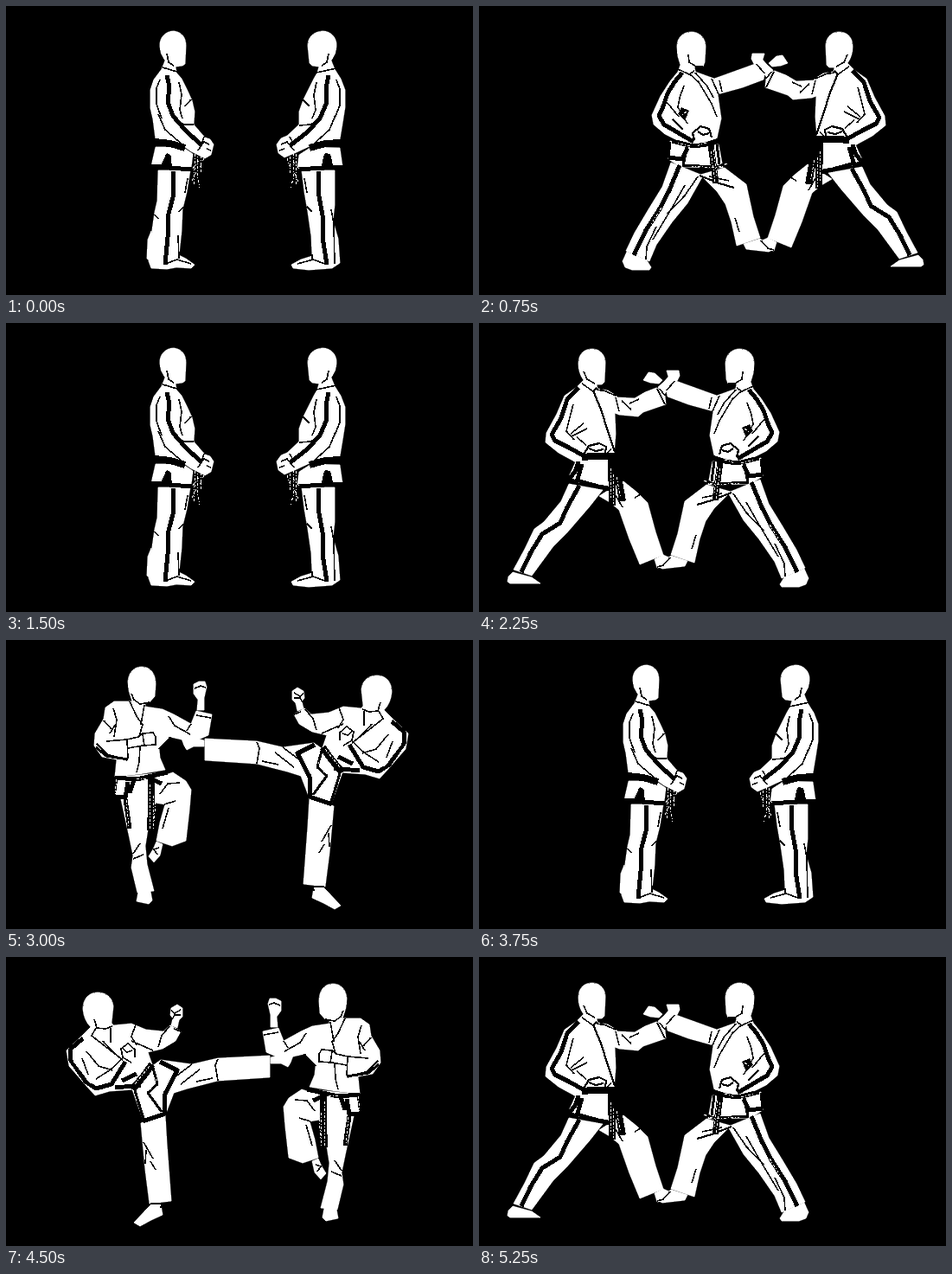
Write an HTML page that moves like this. It is 540 by 334 pixels and loops after 6000 ms.

```html
<!DOCTYPE html>
<html lang="en">
<head>
<meta charset="utf-8">
<title>Sparring drill</title>
<style>
html, body { margin: 0; width: 100%; height: 100%; overflow: hidden; background: #000; }
svg { display: block; width: 100vw; height: 100vh; }
path { fill: none; stroke: #000; stroke-linejoin: round; shape-rendering: crispEdges; }
.w { fill: #fff; stroke: #fff; stroke-width: .8; }
.k { fill: #000; stroke: none; }
.l { stroke-width: 1.6; }
.m { stroke-width: 3; }
.s { stroke-width: 5; }
.b { stroke-width: 8; }
.h { stroke: #fff; stroke-width: 1; stroke-dasharray: 3 2 1 2; }
#stage > g { opacity: 0; }
</style>
</head>
<body>
<svg viewBox="0 0 540 334">
<defs>
  <g id="stand">
    <!-- left -->
    <path class="w" d="M178 47C177 36 185 29 194 29C203 30 208 36 208 46L207 67L204 69L196 70L197 77L203 84L209 96L215 109L218 122L217 137L230 152L236 154L240 160L237 172L230 176L214 168L204 161L173 154L170 131L167 118L167 97L171 85L180 73L184 63Q178 55 178 47Z"/>
    <path class="w" d="M173 163L204 163L216 171L214 187L168 185Z"/>
    <path class="w" d="M176 190L213 190L209 215L204 235L203 260L200 288L208 292L218 299L214 303L197 302L186 304L168 303L165 295L168 266L172 238L175 225Z"/>
    <path class="w" d="M164 270L168 260L167 295L163 292Z"/>
    <path class="l" d="M186 55L188 65L194 69M181 71L198 76M178 85L174 95L174 113L180 130M200 88L203 102L201 120L204 130M214 108L207 116M196 132L206 137L217 137M222 167L229 157L235 160M229 151L226 160M232 165L237 167M176 125L184 143L205 161"/>
    <path class="s" d="M186 80L189 93L187 111L193 127L207 143L226 161"/>
    <path class="b" d="M172 157L190 159L207 164"/>
    <path class="s" d="M167 185L181 186L187 173L189 187L215 189"/>
    <path class="k" d="M180 186L186 170L191 173L192 190Z"/>
    <path class="s" d="M194 191L193 221L188 240L187 267L184 299"/>
    <path class="l" d="M205 232L200 238M199 265L200 292M184 298L198 293L214 298M172 241L176 246M210 199L207 216"/>
    <path class="h" d="M219 171L217 207M222 169L221 197L224 210M226 173L225 193M229 176L224 188M216 188L223 178M215 202L220 192"/>
    <!-- right -->
    <path class="w" d="M382 47C383 36 375 29 366 29C355 30 349 36 349 46L351 66L354 69L362 70L360 77L356 84L350 96L344 108L339 122L339 137L325 150L318 153L313 160L315 170L322 175L336 169L351 162L386 154L389 136L392 117L392 97L387 84L380 73L376 63Q382 55 382 47Z"/>
    <path class="w" d="M386 164L353 163L339 172L337 187L389 185Z"/>
    <path class="w" d="M342 190L380 190L380 230L378 248L384 269L386 297L377 303L350 305L332 303L330 299L341 293L354 289L353 266L349 238L345 215Z"/>
    <path class="l" d="M373 55L371 65L365 69M359 77L382 72M382 85L386 96L386 115L379 132M359 88L356 103L358 120L354 130M343 108L351 116M363 132L352 137L339 138M333 167L325 157L318 160M328 151L333 160M322 165L316 167M381 126L374 143L354 161"/>
    <path class="s" d="M373 80L370 95L371 111L363 130L348 146L329 161"/>
    <path class="b" d="M387 158L369 159L351 164"/>
    <path class="s" d="M391 186L375 186L370 173L367 187L337 189"/>
    <path class="k" d="M364 190L369 170L375 171L379 188Z"/>
    <path class="s" d="M361 191L362 220L366 242L366 267L371 299"/>
    <path class="l" d="M348 232L354 238M376 235L379 252L380 298M354 287L354 294M369 298L355 293L337 298M345 199L348 216"/>
    <path class="h" d="M335 171L335 207M332 170L333 197L329 210M328 174L329 193M325 176L329 188M339 188L330 178M338 203L333 192"/>
  </g>

  <g id="guard">
    <!-- left -->
    <path class="w" d="M115 47C115 35 122 30 131 30C140 30 146 37 146 46L145 68L142 71L136 71L137 76L149 78L157 83L160 86L180 87L192 80L205 75L210 77L215 84L216 94L190 103L184 108L162 106L157 104L158 128L156 153L122 156L114 162L92 150L77 138L78 127L90 105L99 84L112 75L121 66Q115 58 115 47Z"/>
    <path class="w" d="M207 74L214 68L219 62L217 55L231 55L232 61L228 69L219 75L214 83Z"/>
    <path class="w" d="M112 160L156 155L156 190L102 182Z"/>
    <path class="w" d="M104 186L143 193L128 212L103 241L86 258L61 292L40 285L53 261L64 238L75 230L95 206Z"/>
    <path class="w" d="M39 288L61 294L71 301L36 301L33 299L34 293Z"/>
    <path class="w" d="M139 200L150 193L167 183L182 195L195 208L204 241L213 268L186 279L174 250L162 216L151 207Z"/>
    <path class="w" d="M203 273L213 268L222 272L217 281L206 283Z"/>
    <path class="l" d="M121 56L125 65L134 70M119 70L132 79L136 75M136 77L148 79M109 94L105 109L101 125L110 135M121 116L106 128M125 122L107 131M158 86L162 102M165 90L176 100M185 88L174 93M206 76L215 94M209 76L215 84M147 151L153 146M158 199L166 213M187 198L180 202M113 132L124 141M140 76L158 84"/>
    <path style="stroke-width:2.2" d="M132 78L141 100L149 125L157 149M121 152L127 142L139 139L147 143L146 150M127 145L135 148L144 146"/>
    <path class="s" d="M115 75L102 88L95 110L84 129L88 136L104 144L122 154"/>
    <path class="b" d="M119 155L132 154L158 154"/>
    <path class="s" d="M115 160L112 170L104 181L113 184L119 163M116 183L138 189L154 192"/>
    <path class="s" d="M116 188L102 213L94 231L73 244L60 265L49 288"/>
    <path class="b" d="M153 154L154 211M157 155L166 206"/>
    <path class="h" d="M152 168L152 202M156 175L155 209M159 178L164 202"/>
    <!-- right -->
    <path class="w" d="M285 47C285 36 293 30 301 30C311 30 318 36 318 47Q318 59 314 68L317 76L326 87L337 104L347 126L345 137L332 148L318 155L298 161L272 153L267 130L271 102L242 94L218 85L216 73L225 66L250 75L275 84L297 76L298 70L288 70L286 65Z"/>
    <path class="w" d="M190 66L196 57L203 58L212 66L208 70L198 69Z"/>
    <path class="w" d="M270 160L298 164L326 156L328 177L314 186L265 187Z"/>
    <path class="w" d="M263 187L291 195L272 214L262 229L255 250L249 277L222 268L230 243L238 206Z"/>
    <path class="w" d="M288 196L325 181L335 209L351 235L367 262L377 283L350 295L342 276L324 250L306 228Z"/>
    <path class="w" d="M222 269L241 275L238 281L212 284L206 281Z"/>
    <path class="w" d="M353 294L376 284L381 295L378 302L370 305L350 305L348 302Z"/>
    <path class="l" d="M305 56L304 65L296 70L288 70M298 75L304 79L317 73M303 79L293 88L278 113L272 128M297 77L283 93L276 106M310 92L315 106L317 117L306 136M278 84L270 102M269 86L266 99M226 67L217 78M330 111L316 128M323 131L311 143M206 282L213 280L221 271M258 202L281 197M294 197L309 219L329 240M309 207L322 230L346 270M342 255L353 278L354 293M251 245L246 261"/>
    <path style="stroke-width:2.2" d="M278 152L281 142L291 139L300 147L298 155M281 147L288 149L294 145M252 210L269 205L292 196"/>
    <path class="s" d="M312 77L321 88L329 101L334 116L339 127L333 137L316 147L299 157"/>
    <path class="k" d="M304 121L313 117L317 125L309 132Z"/>
    <path class="s" d="M270 155L284 160L299 162L324 156M306 164L312 177L328 175"/>
    <path class="m" d="M326 157L328 175M272 160L269 183M258 181L272 186L312 184M306 162L311 184"/>
    <path class="s" d="M315 184L327 213L339 236L354 259L368 288"/>
    <path d="M279 160L273 205" style="stroke-width:7"/>
    <path class="h" d="M260 182L272 187L301 185M279 168L274 203M276 166L272 198M284 158L296 162M303 162L318 158M336 233L348 252M307 122L314 127"/>
  </g>

  <g id="kick">
    <!-- blocker -->
    <path class="w" d="M141 48C142 36 149 31 157 31C168 31 173 40 173 51L172 65L166 72L161 73L161 77L181 80L194 86L214 97L220 82L238 86L234 110L216 118L190 112L177 126L178 136L184 150L154 155L126 158L128 138L111 135L102 122L103 108L113 91L115 78L125 71L146 71Q141 59 141 48Z"/>
    <path class="w" d="M217 51L223 48L230 48L232 54L229 67L229 81L221 81L222 69L217 62Z"/>
    <path class="w" d="M126 159L183 153L178 176L164 184L123 182Z"/>
    <path class="w" d="M133 184L166 181L165 213L161 238L163 259L171 290L152 292L145 263L147 249L142 225Z"/>
    <path class="w" d="M153 291L167 290L169 301L165 305L151 302Z"/>
    <path class="w" d="M171 171L181 157L193 153L208 163L214 173L212 197L208 232L192 238L174 232L178 211L184 190L172 188Z"/>
    <path class="w" d="M174 233L181 236L178 249L171 257L165 250L170 242Z"/>
    <path class="l" d="M145 62L148 69L155 74L166 72M143 71L151 88L158 98L154 111M160 75L156 98M155 122L154 141L151 153M124 79L128 92L125 112M113 93L122 103M127 97L120 108M140 115L153 112L158 108L170 107L173 112L173 121L158 122L141 125M140 115L141 137M116 117L140 115M105 120L117 132L140 139M158 109L160 122M188 88L195 99L213 109M214 97L209 105M177 126L190 112M220 87L237 90M218 56L225 53L231 55M178 178L187 166L201 165M183 190L196 186M147 247L155 235M147 253L159 248M188 194L181 218M177 240L171 242L175 248"/>
    <path class="s" d="M126 159L151 161L187 153"/>
    <path class="m" d="M104 124L116 134L141 138"/>
    <path class="s" d="M127 159L124 181L138 182L141 164M138 184L143 218M149 158L143 177M163 158L180 166"/>
    <path class="b" d="M168 161L168 190L167 220"/>
    <path class="h" d="M166 167L166 220M170 180L170 218M173 187L171 209M139 185L142 216M128 161L126 178M151 161L162 160"/>
    <!-- kicker -->
    <path class="w" d="M411 57C412 46 420 41 429 41C439 41 446 48 446 60Q445 73 437 81L448 92L465 108L462 126L442 149L432 160L415 155L387 153L365 127L371 110L354 106L339 97L333 86L345 79L353 86L373 84L390 77L411 79L413 76Z"/>
    <path class="w" d="M331 59L337 55L344 59L345 67L342 71L344 79L337 82L335 73L331 69Z"/>
    <path class="w" d="M230 114L290 117L320 124L356 119L366 126L389 153L375 192L351 183L341 157L325 152L290 143L230 139Z"/>
    <path class="w" d="M203 114L214 113L229 116L229 123L217 123L209 127L206 122Z"/>
    <path class="w" d="M351 182L379 192L374 246L369 285L344 282L349 215Z"/>
    <path class="w" d="M356 286L367 286L375 294L387 307L380 311L367 304L354 298Z"/>
    <path class="l" d="M412 80L420 83L430 82L433 72M414 82L414 99M431 82L436 91L418 105L400 119M423 97L410 111M385 78L390 92L384 102M390 97L365 108M346 80L355 91L359 104M333 86L341 83M333 61L340 65L344 62M333 67L340 67L343 72M386 116L386 107L394 100L402 106L400 116L390 122M389 108L395 110L400 106M400 117L414 130L431 141M442 109L428 126L412 131M447 117L440 136M290 118L293 125L290 143M296 140L315 144M311 130L333 147M320 124L340 139L350 155M373 223L374 239M365 233L376 214M362 246L368 236M356 290L355 285L368 285"/>
    <path class="s" d="M446 94L460 106L461 118L443 144L431 152L413 147L397 121"/>
    <path class="l" d="M455 107L456 121L437 146" style="stroke:#fff"/>
    <path class="b" d="M366 124L377 139L389 153"/>
    <path class="s" d="M357 121L337 131L351 158L351 181L377 190M379 148L409 151M384 135L401 143"/>
    <path class="m" d="M365 128L360 147L371 157L355 179M387 151L376 187"/>
    <path class="h" d="M369 126L386 147M366 133L378 149M361 141L368 154M342 132L354 154M383 139L400 148"/>
  </g>
</defs>
<g id="stage">
  <g><use href="#stand"/></g>
  <g><use href="#guard"/></g>
  <g><use href="#guard" transform="translate(547) scale(-1 1)"/></g>
  <g><use href="#kick"/></g>
  <g><use href="#kick" transform="translate(535) scale(-1 1)"/></g>
</g>
</svg>
<script>
const STAND = 0, GUARD = 1, GUARD_FLIP = 2, KICK = 3, KICK_FLIP = 4;
const steps = [STAND, GUARD_FLIP, STAND, GUARD, KICK, STAND, KICK_FLIP, GUARD];
const beat = 750;

[...document.querySelectorAll('#stage > g')].forEach((pose, id) => {
  const frames = steps.map((step, i) => ({
    offset: i / steps.length,
    opacity: step === id ? 1 : 0,
    easing: 'step-end'
  }));
  frames.push({ offset: 1, opacity: frames[0].opacity });
  pose.animate(frames, { duration: beat * steps.length, iterations: Infinity });
});
</script>
</body>
</html>
```
